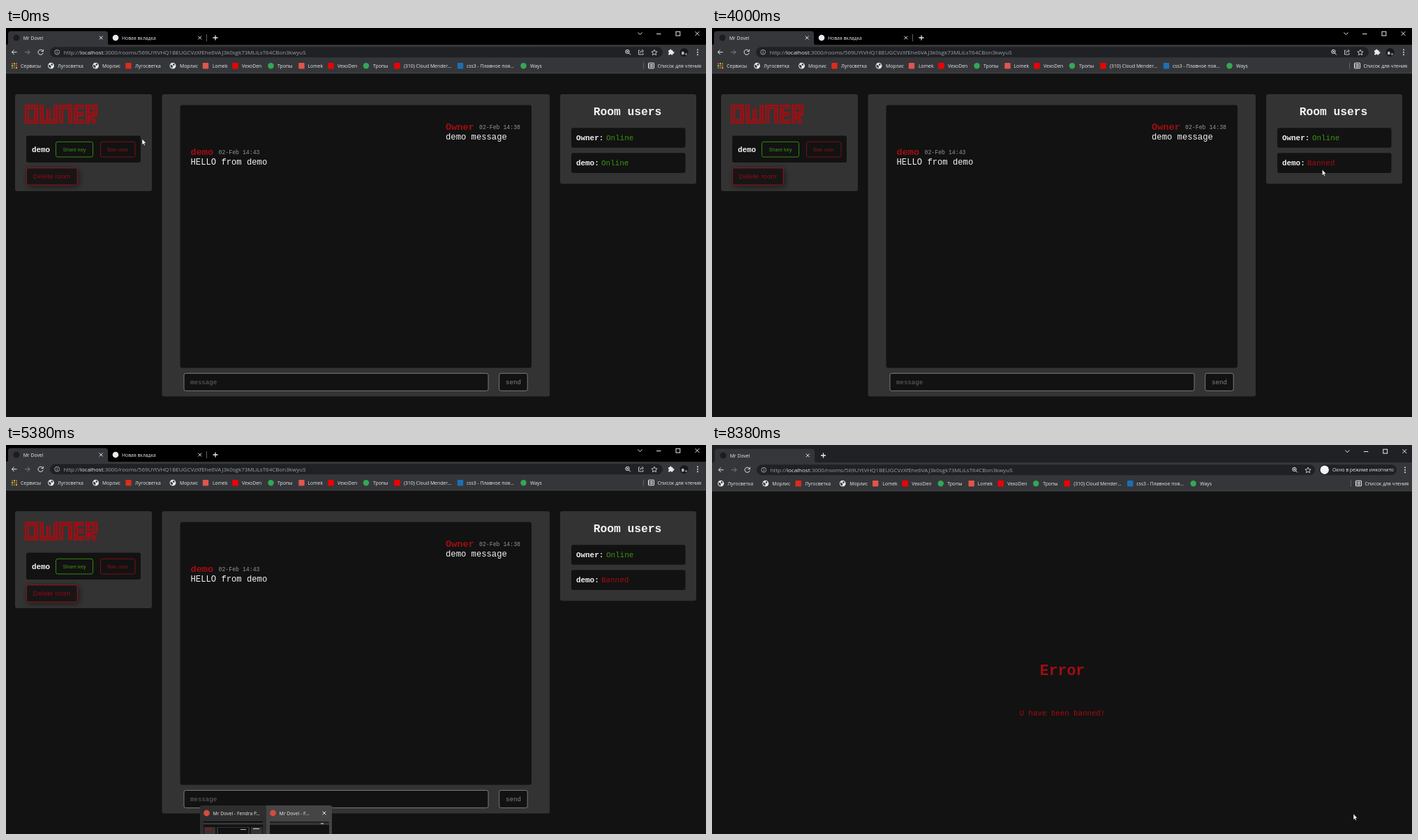
An HTML page that plays this animation: 1003x558 px, repeating every 8.88 s.

```html
<!DOCTYPE html>
<html lang="ru">
<head>
<meta charset="utf-8">
<title>Chat room</title>
<style>
html, body { margin: 0; width: 100%; height: 100%; overflow: hidden; background: #121212; }
svg { display: block; width: 100%; height: 100%; }
text { white-space: pre; }
.ui { font: 6.85px "Open Sans", "Noto Sans", sans-serif; fill: #e8eaed; }
.url { font: 8px "Open Sans", "Noto Sans", sans-serif; fill: #9aa0a6; }
.mono { font-family: "Liberation Mono", monospace; }
.btn { font-family: "Liberation Sans", sans-serif; text-anchor: middle; }
.line { fill: none; stroke: #e8eaed; stroke-width: 1; }
</style>
</head>
<body>
<svg id="stage" viewBox="0 0 1003 558" preserveAspectRatio="none"></svg>
<script>
const LOOP = 8880, STEP = 125;
const RED = '#a30d12', GREEN = '#3b960f', PANEL = '#333333', DARK = '#121212', BAR = '#35363a';

const rect = (x, y, w, h, fill, r = 0, extra = '') =>
  `<rect x="${x}" y="${y}" width="${w}" height="${h}" rx="${r}" fill="${fill}" ${extra}/>`;
const dot = (x, y, r, fill) => `<circle cx="${x}" cy="${y}" r="${r}" fill="${fill}"/>`;
const line = (d, extra = '') => `<path class="line" d="${d}" ${extra}/>`;
const ui = (x, y, s) => `<text class="ui" x="${x}" y="${y}">${s}</text>`;
const mono = (x, y, size, fill, s, extra = '') =>
  `<text class="mono" x="${x}" y="${y}" font-size="${size}" fill="${fill}" ${extra}>${s}</text>`;
const group = (s, extra = '') => `<g ${extra}>${s}</g>`;
const at = (x, y, s) => group(s, `transform="translate(${x} ${y})"`);
const cross = (x, y, r = 2.4) =>
  line(`M${x - r} ${y - r}l${2 * r} ${2 * r}M${x + r} ${y - r}l${-2 * r} ${2 * r}`);
const bold = 'font-weight="700"', mid = 'text-anchor="middle"';

const square = (x, fill) => rect(x - 4.2, 50, 8.4, 8.4, fill, 1);
const globe = x => dot(x, 54.2, 4.4, '#e8eaed') +
  `<path d="M${x - 3.4} 52.5l2.6 1 1 2-1.2 2.2-2.4-2.2zM${x + .4} 50.8l2.4 1-.8 2.2-2-.6z" fill="#3c4043"/>`;
const disc = (x, fill) => dot(x, 54.2, 4.2, fill);

const AIR = 'Лугосветка', FIND = 'Морлис', MAIL = 'Lomek', VIDEO = 'VexoDen', TRAIL = 'Тропы', SITE = 'Mr Dovel';

const bookmarks = [
  [globe, 64.5, 74, AIR], [globe, 128.5, 138, FIND], [square, 175.5, 185, AIR, '#dd2c1b'],
  [globe, 239, 249, FIND], [square, 286, 296, MAIL, '#e0564b'], [square, 328.5, 338, VIDEO, '#f00000'],
  [disc, 379.5, 389, TRAIL, '#34a853'], [square, 423.5, 432.5, MAIL, '#e0564b'],
  [square, 465.5, 475, VIDEO, '#f00000'], [disc, 516, 526, TRAIL, '#34a853'],
  [square, 560.5, 570, '(310) Cloud Mender...', '#f00000'],
  [square, 651, 660, 'css3 - Плавное поя...', '#1c6fb5'], [disc, 741.5, 751, 'Ways', '#34a853']
].map(([icon, ix, tx, label, fill]) => icon(ix, fill) + ui(tx, 56.6, label)).join('');

const apps = [0, 1, 2].flatMap(r => [0, 1, 2].map(c =>
  rect(8 + c * 3, 50.2 + r * 3, 2, 2, ['#ea4335', '#fbbc04', '#34a853'][(r + c) % 3]))).join('');

const readList = line('M913.5 49.5v9', 'stroke="#5f6368" style="stroke:#5f6368"') +
  rect(920.5, 50.2, 8, 7.6, 'none', .6, 'stroke="#e8eaed"') +
  line('M923 52.3h4M923 54h4M923 55.8h4M921.3 52.3h1M921.3 54h1M921.3 55.8h1', 'stroke-width=".7"') +
  ui(933.5, 56.6, 'Список для чтения');

const controls = line('M905.5 6.5l3 3 3-3') + line('M932 8.5h6.5') +
  rect(960, 5.2, 5.8, 5.8, 'none', 0, 'stroke="#e8eaed"') + cross(990.5, 8, 2.9);

const tab = `<path d="M0 24.5Q3 24.5 3 20V8.500Q3 4.500 7 4.500H142Q146 4.500 146 8.500V20Q146 24.500 149 24.500Z" fill="${BAR}"/>` +
  dot(15, 14, 4.5, '#1d1d1f') + ui(24.7, 16.7, SITE) + cross(136.2, 14);

const plus = x => line(`M${x - 3.5} 14h7M${x} 10.500v7`, 'style="stroke-width:1.3"');
const zoom = x => `<circle class="line" cx="${x - .6}" cy="33.900" r="2.700"/>` +
  line(`M${x + 1.5} 36l2.300 2.400M${x - 1.8} 33.900h2.400M${x - .6} 32.700v2.400`);
const star = x => line(`M${x} 31l1.200 2.700 2.900.3-2.200 1.900.7 2.900-2.600-1.500-2.600 1.500.7-2.900-2.200-1.900 2.900-.3z`, 'style="stroke-width:.8"');
const menu = x => [31.2, 34.7, 38.2].map(y => dot(x, y, .95, '#e8eaed')).join('');

const nav = line('M15.500 34.700H8.500M11.700 31.400L8.400 34.700l3.300 3.300') +
  line('M27 34.700h7M30.800 31.400l3.300 3.300-3.300 3.300', 'style="stroke:#7c8084"') +
  line('M52.600 32.700A3.600 3.600 0 1 0 53.100 35.700M53.300 30.800v2.800h-2.800') ;

const address = w => rect(63, 27.2, w, 15, '#202124', 7.5) +
  `<circle class="line" cx="73.200" cy="34.700" r="3.400" style="stroke:#bdc1c6;stroke-width:.8"/>` +
  line('M73.200 34.200v2.400M73.200 32.500v.9', 'style="stroke:#bdc1c6;stroke-width:.9"') +
  '<text class="url" x="82.500" y="37.600">http://<tspan fill="#e8eaed">localhost</tspan>' +
  ':3000/rooms/569UYtVHQ1BEUGCVzXfEhe6VAJ3k0sgk73MLiLsT64CBon3kwyuS</text>';

const barBase = strip => rect(0, 0, 1003, 24.5, strip) + rect(0, 24, 1003, 41, BAR) +
  rect(0, 64.5, 1003, .8, '#4b4c50');

const mainBar = barBase('#000') + tab + dot(157, 14, 4.3, '#e8eaed') + ui(166, 16.7, 'Новая вкладка') +
  cross(277.7, 14) + line('M287.500 9v10', 'style="stroke:#5f6368"') + plus(300) + controls + nav + address(878) +
  zoom(891) + line('M908.500 32h-2v6h6.500v-2M908.500 36q0-3 3.500-3M911 30.800l2.500 2.200-2.500 2.200', 'style="stroke-width:.8"') +
  star(929) + rect(949, 32, 6.6, 6.6, '#e8eaed', 1) + dot(952.2, 31.8, 1.4, '#e8eaed') + dot(956, 35.3, 1.4, '#e8eaed') +
  dot(949.2, 35.6, 1, BAR) + dot(952.2, 38.4, 1, BAR) +
  dot(971.7, 35, 6, '#151719') + `<ellipse cx="969.800" cy="36" rx="2" ry="2.600" fill="#b8b4ae"/>` +
  dot(974.5, 37.5, 1.7, '#77746f') + menu(991) +
  apps + ui(21, 56.6, 'Сервисы') + bookmarks + readList;

const privateBar = rect(0, 0, 1003, 3, '#202124') + at(0, 1, barBase('#202124')) + at(1, 1, tab + plus(158.5) + nav + address(800)) +
  at(1.8, 1, controls) + at(0, 1, zoom(835) + star(854) + rect(870, 27.2, 111, 15, '#202124', 7.5) +
  dot(877.7, 34.7, 6.2, '#f1f3f4') + ui(889, 37.1, 'Окно в режиме инкогнито') + menu(993)) +
  at(-51.8, 1, bookmarks) + at(2, 1, readList);

// Striped display lettering for the room owner
const letters = 'M30 113H43V134H30ZM51 110V134H71V110M61 116V134M79 137V113H92V137' +
  'M112 113H100V134H112M100 123.500H111M117 137V113H128V123.500H117M120 123.500L128 137';
const heading = group(`<path d="${letters}" stroke="${RED}" stroke-width="6"/>` +
  `<path d="${letters}" stroke="${PANEL}" stroke-width="1.100"/>`, 'fill="none" role="img" aria-label="OWNER"');

const button = (x, y, w, h, color, size, label, id = '') =>
  group(rect(x, y, w, h, DARK, 2.5, 'stroke="currentColor" stroke-width=".9"') +
    `<text class="btn" x="${x + w / 2}" y="${y + h / 2 + size * .35}" font-size="${size}" fill="currentColor">${label}</text>`,
    `${id && `id="${id}"`} color="${color}"`);

const post = (x, y, name, when, dx, body) => mono(x, y, 13.6, RED, name, bold) +
  mono(x + dx, y - 1, 8.2, '#959595', when) + mono(x, y + 14.2, 12.2, '#f4f4f4', body);

const room = rect(0, 65, 1003, 493, DARK) + mainBar +
  rect(13, 95, 196, 139, PANEL, 3) + heading + rect(29, 154.5, 164, 38.5, DARK, 3) +
  mono(37, 177.5, 10.9, '#f4f4f4', 'demo', bold) +
  button(71.5, 163.3, 53, 21.7, GREEN, 7.35, 'Share key') + button(135.5, 163.3, 49.5, 21.7, '#8a1015', 7.5, 'Ban user', 'ban') +
  group(button(29.5, 201, 72.5, 24, '#9c1117', 9.9, 'Delete room'), 'filter="url(#shade)"') +
  rect(223.5, 95, 555.5, 433.5, PANEL, 3) + rect(249.5, 110.5, 503.5, 377, DARK, 3) +
  post(630, 146, 'Owner', '02-Feb 14:38', 48, 'demo message') + post(264.5, 181.5, 'demo', '02-Feb 14:43', 40, 'HELLO from demo') +
  rect(255, 495.4, 436, 25, DARK, 2.5, 'stroke="#858585" stroke-width=".9"') + mono(264, 511, 9.1, '#676767', 'message') +
  rect(706.7, 495.4, 40.5, 25, DARK, 2.5, 'stroke="#858585" stroke-width=".9"') + mono(727, 511, 9.1, '#858585', 'send', mid) +
  rect(794, 95, 195, 128.5, PANEL, 3) + mono(890.5, 125, 16.3, '#f4f4f4', 'Room users', `${bold} ${mid}`) +
  rect(810, 143.2, 163.5, 28.5, DARK, 3) + rect(810, 179.3, 163.5, 28.7, DARK, 3) +
  mono(817, 161.3, 10.9, '#f4f4f4', 'Owner:', bold) + mono(860, 161.3, 10.9, GREEN, 'Online') +
  mono(817, 197.2, 10.9, '#f4f4f4', 'demo:', bold) + mono(853, 197.2, 10.9, GREEN, 'Online', 'id="status"');

const errorPage = rect(0, 66, 1003, 492, DARK) + privateBar +
  mono(502, 330, 21.5, RED, 'Error', `${bold} ${mid}`) + mono(502, 388.2, 10.75, RED, 'U have been banned!', mid);

const messenger = `<path d="M362 558V520q0-3 3-3H485q3 0 3 3V558Z" fill="#3b3b3b"/>` + dot(371, 528, 4.4, '#f4f4f4') +
  ui(380, 530.5, 'Мессенджер — Морлис.Обзор...') + rect(366, 540, 118, 18, '#1b1c20') +
  rect(366, 540, 118, 1.5, '#4f5a66') + rect(366, 543, 118, 3, '#2d3036') + rect(390, 544, 9, 1.2, '#3f77b5') +
  rect(400, 546, 60, 12, '#25272b') + [406, 412, 420, 446].map(x => dot(x, 551, 2, '#8b8d90')).join('');

const preview = `<path d="M278 558V520q0-3 3-3H464q3 0 3 3V558Z" fill="#2e2e2e"/>` +
  `<path id="lit" d="M373 558V517H464q3 0 3 3V558Z" fill="#454545"/>` +
  dot(287.5, 528, 4.4, '#d94b3d') + dot(382.5, 528, 4.4, '#d94b3d') + ui(296.5, 530.5, `${SITE} - Fendra P...`) +
  `<text class="ui" id="second" x="391.500" y="530.500"></text>` + group(cross(456, 528), 'id="shut"') +
  rect(283, 540, 85, 18, DARK) + rect(283, 540, 85, 1.5, '#000') + rect(283, 541.5, 85, 3, BAR) +
  rect(284, 548, 16, 10, PANEL) + rect(285.5, 549.5, 9, 2.2, RED) + rect(302, 548, 47, 10, PANEL) +
  rect(304, 549, 43, 9, DARK) + rect(336, 551, 8, 1, '#b8b8b8') + rect(351, 548, 16, 10, PANEL) + rect(354, 550, 9, 1, '#ddd') +
  rect(378, 540, 85, 18, DARK) + rect(378, 540, 85, 2, '#202124') + rect(378, 542, 85, 3, BAR) + rect(451, 542.5, 4, 1, '#e8eaed');

const pointer = 'fill="#fff" stroke="#000" stroke-width=".5"';
const stage = document.getElementById('stage');
stage.innerHTML = `<defs><filter id="shade" x="-30%" y="-60%" width="160%" height="220%">
  <feDropShadow dx="2" dy="2" stdDeviation="4" flood-color="#000" flood-opacity=".55"/></filter></defs>` +
  group(room, 'id="room"') + group(errorPage, 'id="error"') + group(messenger, 'id="messenger"') + group(preview, 'id="preview"') +
  group(`<path id="arrow" d="M0 0V8.600L1.900 6.900 3.200 9.800 4.500 9.200 3.300 6.300H5.800Z" ${pointer}/>` +
    `<path id="hand" d="M-1 .6Q0-.8 1 .6V4L4 4.800Q5.200 5.200 5 6.800L4 10.500H-.5L-3.400 6.800Q-3.500 5.300-2.200 5.800L-1 6.900Z" ${pointer}/>`, 'id="cursor"');

const $ = id => document.getElementById(id);
const show = (id, on) => $(id).setAttribute('display', on ? 'inline' : 'none');

// Cursor keys: tick, x, y
const path = [
  [0, 195, 159], [1, 195, 159], [3, 189, 184], [6, 189, 184], [11, 179.5, 180], [13, 178.3, 177.5], [26, 178.3, 177.5],
  [29, 520, 232], [31, 820, 212], [32, 874.3, 203], [33, 866, 212], [34, 866, 212], [37, 420, 575], [63, 420, 575],
  [64, 640, 546], [66, 932, 522], [67, 919, 529], [72, 919, 529]
];

function place(tick) {
  const i = Math.max(1, path.findIndex(k => k[0] >= tick));
  const [t0, x0, y0] = path[i - 1], [t1, x1, y1] = path[i];
  const p = (tick - t0) / (t1 - t0);
  return [x0 + (x1 - x0) * p, y0 + (y1 - y0) * p];
}

function draw(ms) {
  const tick = Math.floor((ms % LOOP + 5) / STEP);
  const within = (a, b) => tick >= a && tick < b;
  const hover = within(9, 27), banned = tick >= 25, lit = within(43, 45);
  show('room', tick < 45);
  show('error', tick >= 45);
  show('messenger', within(37, 40));
  show('preview', within(40, 45));
  show('lit', lit);
  show('shut', lit);
  $('second').textContent = SITE + (lit ? ' - F...' : ' - Fendra P...');
  $('ban').setAttribute('color', hover ? '#b5131a' : '#8a1015');
  $('status').textContent = banned ? 'Banned' : 'Online';
  $('status').setAttribute('fill', banned ? RED : GREEN);
  show('arrow', !hover);
  show('hand', hover);
  $('cursor').setAttribute('transform', `translate(${place(tick).join(' ')})`);
}

const start = performance.now();
function run() {
  draw(performance.now() - start);
  requestAnimationFrame(run);
}
run();
</script>
</body>
</html>
```
